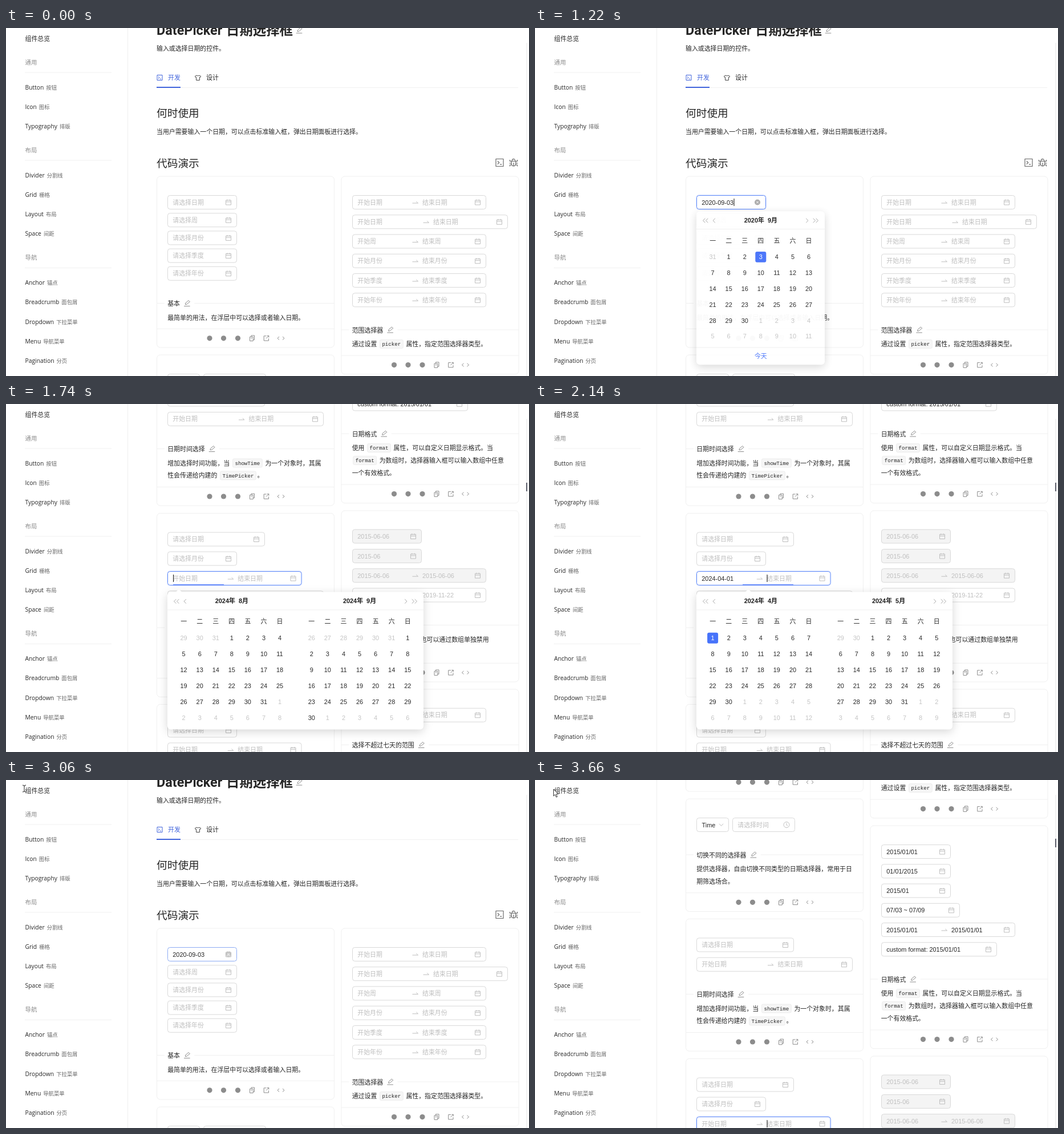
An HTML page for the animation above (4.26 s loop, 917 by 610 pixels).

```html
<!DOCTYPE html>
<html lang="zh-CN">
<head>
<meta charset="utf-8">
<title>日期选择框</title>
<style>
html, body { margin: 0; width: 100%; height: 100%; overflow: hidden; background: #fff; }
svg { display: block; width: 100vw; height: 100vh; }
text { font-family: "Liberation Sans", "Noto Sans CJK SC", "Noto Sans CJK", sans-serif; white-space: pre; }
.side { font-family: "Open Sans", "Noto Sans CJK SC", "Noto Sans CJK", sans-serif; }
.head { font-family: Roboto, "Noto Sans CJK SC", "Noto Sans CJK", sans-serif; }
.code { font-family: "Liberation Mono", monospace; }
.sheet { filter: drop-shadow(0 4px 8px rgba(0,0,0,.16)); }
</style>
</head>
<body>
<svg id="stage" viewBox="0 0 917 610" preserveAspectRatio="none">
  <g id="page"></g><g id="side"></g><g id="over"></g>
</svg>
<script>
const EM = 10.92, LOOP = 4260;
const INK = '#262626', HINT = '#bfbfbf', GREY = '#8c8c8c', RULE = '#f0f0f0', EDGE = '#d9d9d9';
const BLUE = '#4773fa', TAB = '#4164dc';
const el = id => document.getElementById(id);

// Text is placed by its visual centre line.
const text = (x, y, s, { size = EM, fill = INK, cls = '', mid = false, bold = false } = {}) =>
  `<text x="${x}" y="${y + size * .37}" font-size="${size}" fill="${fill}" class="${cls}"` +
  `${mid ? ' text-anchor="middle"' : ''}${bold ? ' font-weight="700"' : ''}>${s}</text>`;
const rect = (x, y, w, h, r, fill, stroke = 'none') =>
  `<rect x="${x}" y="${y}" width="${w}" height="${h}" rx="${r}" fill="${fill}" stroke="${stroke}"/>`;
const line = (x1, y1, x2, y2, c = RULE, w = 1) =>
  `<path d="M${x1} ${y1}L${x2} ${y2}" stroke="${c}" stroke-width="${w}"/>`;
const icon = (x, y, d, c = GREY, w = 1) =>
  `<path transform="translate(${x} ${y})" d="${d}" fill="none" stroke="${c}" stroke-width="${w}" stroke-linejoin="round"/>`;
const caret = (x, y) => line(x, y - 6.5, x, y + 6.5, '#111');

const CAL = 'M-4.5-3.5h9v8h-9zM-4.5-.7h9M-2.2-5v2.6M2.2-5v2.6';
const CLOCK = 'M5 0A5 5 0 1 1-5 0A5 5 0 1 1 5 0M0-3V.3L2.2 1.7';
const PENCIL = 'M-3 2.2L-2.5-.4L2.8-5L5-2.7L-.4 1.8ZM-5.3 5H5.3';
const ARROW = 'M-5 1.5H5L1.8-1.5';
const TERM = 'M-4.5-4.5h9v9h-9zM-2.5-2L-.5 0L-2.5 2M.5 2.2h2';
const SHIRT = 'M-2-4Q0-2 2-4L5-2.5L4-.3L2.9-.7V4.5H-2.9V-.7L-4-.3L-5-2.5Z';
const BUG = 'M-3.8-2.5H3.8V2A3.8 4 0 0 1-3.8 2ZM-2.8-2.5A2.8 3.8 0 0 1 2.8-2.5M0 0V6M-7.5 1H-3.8M3.8 1H7.5M-6.5-5V-2.5H-3.8M6.5-5V-2.5H3.8M-6.5 6.5V4H-3.5M6.5 6.5V4H3.5';
const COPY = 'M-4-2.5h5.8v7.3H-4zM-1.6-2.5V-4.8H4V2.6H1.8M-2.2 0H0';
const EXPORT = 'M0-4H-4.3V4.3H4V.5M1.3-4.3H4.3V-1.3M4.3-4.3L-.5.5';
const CODE = 'M-3-2.8L-6 0L-3 2.8M3-2.8L6 0L3 2.8';

const clear = (x, y, o = 1) => `<g opacity="${o}"><circle cx="${x}" cy="${y}" r="5" fill="#adadad"/>` +
  icon(x, y, 'M-1.8-1.8L1.8 1.8M1.8-1.8L-1.8 1.8', '#fff') + '</g>';

function box(x, y, w, o = {}) {
  const edge = o.edge || EDGE;
  return (o.glow ? rect(x - .5, y - 13.2, w + 1, 26.4, 5, 'none', '#e6edff') : '') +
    rect(x + .5, y - 12, w - 1, 24, 4, o.off ? '#f4f4f4' : '#fff', edge);
}
function field(x, y, w, s, o = {}) {
  const fill = o.dark ? INK : HINT;
  return box(x, y, w, o) + text(x + 9.3, y, s, { fill }) +
    (o.clear === 1 ? '' : icon(x + w - 15, y, o.icon || CAL, HINT)) +
    (o.clear ? clear(x + w - 15, y, o.clear) : '');
}
function range(x, y, w, a, b, o = {}) {
  return field(x, y, w, a, o) + icon(x + w / 2 - 7, y, ARROW, HINT) +
    text(x + w / 2 + 5.5, y, b, { fill: o.darkEnd ? INK : HINT });
}
// Backticks mark inline code.
function rich(x, y, s) {
  let out = '';
  s.split('`').forEach((part, i) => {
    if (i % 2) {
      const w = part.length * 5.5 + 9;
      out += rect(x + 2, y - 7.5, w - 1, 15, 2.5, '#f6f6f6', '#ededed') +
        text(x + 6, y, part, { size: 9.17, cls: 'code' });
      x += w + 3;
    } else if (part) {
      const lead = part.length - part.trimStart().length;
      out += text(x + lead * 3, y, part.trim());
      for (const c of part) x += c === ' ' ? 3 : EM;
    }
  });
  return out;
}
function card(x, top, bottom, title, ty, lines, body) {
  const end = x + 19.5 + title.length * EM;
  let out = rect(x + .5, top + .5, 311, bottom - top, 6, 'none', RULE) + body;
  if (!title) return out;
  out += line(x, ty - .5, x + 14, ty - .5) + line(end + 25, ty - .5, x + 312, ty - .5) +
    text(x + 19.2, ty, title) + icon(end + 12, ty - .5, PENCIL);
  lines.forEach((s, i) => out += rich(x + 19.2, ty + 24.5 + i * 21.9, s));
  if (!lines.length) return out;
  const fy = bottom - 15.7;
  out += line(x, fy - 16.5, x + 312, fy - 16.5);
  [93, 117.5, 142.5].forEach(dx => out += `<circle cx="${x + dx}" cy="${fy}" r="4.6" fill="${GREY}"/>`);
  return out + icon(x + 167.5, fy, COPY) + icon(x + 192.5, fy, EXPORT) + icon(x + 218, fy, CODE);
}

function intro() {
  return text(264, 3, 'DatePicker', { size: 23.4, cls: 'head', bold: true }) +
    text(386, 3, '日期选择框', { size: 23.4, cls: 'head', bold: true }) +
    icon(514, 4, PENCIL) + text(264, 36, '输入或选择日期的控件。') +
    icon(269.5, 87, TERM, TAB) + text(284, 87, '开发', { fill: TAB }) +
    icon(336.5, 87, SHIRT, '#444') + text(351, 87, '设计') +
    line(264, 104.5, 898, 104.5) + line(264, 104, 306, 104, TAB, 2) +
    text(264, 149.5, '何时使用', { size: 18.72 }) +
    text(264, 182, '当用户需要输入一个日期，可以点击标准输入框，弹出日期面板进行选择。') +
    text(264, 237, '代码演示', { size: 18.72 }) +
    `<g transform="translate(865.5 236) scale(1.45)">${icon(0, 0, TERM, '#666', .8)}</g>` + icon(890, 236, BUG, '#666', 1.2);
}
function pageArt(s) {
  const L = 283, R = 607, S = '开始日期', E = '结束日期', D = '2015-06-06';
  const off = { off: true }, dark = { dark: true };
  let basic = field(L, 305.5, 122, s.date || '请选择日期',
    { dark: s.date, edge: s.edge, glow: s.glow, clear: s.wipe });
  ['周', '月份', '季度', '年份'].forEach((n, i) => basic += field(L, 336.7 + i * 31.2, 122, '请选择' + n));

  let spans = '';
  ['日期', '日期', '周', '月份', '季度', '年份'].forEach((n, i) =>
    spans += range(R, 305.5 + i * 34.25, i === 1 ? 273 : 235, '开始' + n, '结束' + n));

  const kinds = box(L, 618.5, 57) + text(292.5, 618.5, 'Time') +
    icon(326.5, 618.5, 'M-3.5-1.8L0 2L3.5-1.8', HINT) + field(346, 618.5, 110, '请选择时间', { icon: CLOCK });

  const formats = ['2015/01/01', '01/01/2015', '2015/01'].map((v, i) =>
      field(R, 665.6 + i * 34.25, 122, v, dark)).join('') +
    field(R, 768.3, 138, '07/03 ~ 07/09', dark) +
    range(R, 802.5, 235, '2015/01/01', '2015/01/01', { dark: true, darkEnd: true }) +
    field(R, 836.8, 203, 'custom format: 2015/01/01', dark);

  const limits = field(L, 1074, 171, '请选择日期') + field(L, 1108, 122, '请选择月份') +
    range(L, 1142.5, 235.5, s.from || S, s.to || E,
      { dark: s.from, darkEnd: s.to, edge: s.redge, glow: s.redge, clear: s.rwipe }) +
    (s.bar ? line(s.bar, 1154, s.bar + 89, 1154, BLUE, 1.6) : '') +
    range(L, 1176.7, 274, S, E);

  const locked = field(R, 1069, 122, D, off) + field(R, 1103.5, 122, '2015-06', off) +
    range(R, 1137.7, 235, D, D, off) + range(R, 1172, 235, '2019-09-03', '2019-11-22', dark);

  return intro() +
    card(264, 259.5, 559.5, '基本', 483, ['最简单的用法，在浮层中可以选择或者输入日期。'], basic) +
    card(264, 572.5, 770, '切换不同的选择器', 671.5,
      ['提供选择器，自由切换不同类型的日期选择器，常用于日', '期筛选场合。'], kinds) +
    card(264, 783, 1014.7, '日期时间选择', 916,
      ['增加选择时间功能，当 `showTime` 为一个对象时，其属', '性会传递给内建的 `TimePicker`。'],
      field(L, 829, 171, '请选择日期') + range(L, 863.3, 274, S, E)) +
    card(264, 1028, 1350, '不可选择日期和时间', 1229.5,
      ['可用 `disabledDate` 和 `disabledTime` 分别禁止选择',
       '部分日期和时间，其中 `disabledTime` 需要和', '`showTime` 一起使用。'], limits) +
    card(264, 1363, 1600, '', 0, [], field(L, 1409, 122, '请选择日期') + range(L, 1443, 235.5, S, E)) +
    card(587.5, 259.5, 606.3, '范围选择器', 529.5, ['通过设置 `picker` 属性，指定范围选择器类型。'], spans) +
    card(587.5, 619.5, 1010.3, '日期格式', 889.5,
      ['使用 `format` 属性，可以自定义日期显示格式。当',
       '`format` 为数组时，选择器输入框可以输入数组中任意', '一个有效格式。'], formats) +
    card(587.5, 1023.5, 1323.5, '禁用', 1225,
      ['选择框的不可用状态。你也可以通过数组单独禁用', 'RangePicker 的其中一项。'], locked) +
    card(587.5, 1336.5, 1600, '选择不超过七天的范围', 1435, [], range(R, 1382.3, 235, S, E));
}

function sideArt() {
  let out = text(33.5, 18.5, '组件总览') + line(213.5, 0, 213.5, 610) + line(913, 26, 913, 610, '#e4e4e4');
  const groups = [
    [60, '通用', 'Button 按钮,Icon 图标,Typography 排版'],
    [214, '布局', 'Divider 分割线,Grid 栅格,Layout 布局,Space 间距'],
    [402.5, '导航', 'Anchor 锚点,Breadcrumb 面包屑,Dropdown 下拉菜单,Menu 导航菜单,Pagination 分页'],
  ];
  for (const [y, name, items] of groups) {
    out += text(33.5, y, name, { size: 10.4, fill: GREY }) + line(33, y + 18, 185, y + 18);
    items.split(',').forEach((item, i) => {
      const [en, zh] = item.split(' ');
      out += text(33.5, y + 43.7 + i * 34.25,
        `${en}<tspan dx="4" font-size="9.36" fill="#666">${zh}</tspan>`, { size: 10.3, cls: 'side' });
    });
  }
  return out;
}

function month(x, top, year, mon, pick) {
  const lead = (new Date(year, mon - 1, 1).getDay() + 6) % 7;
  let out = text(x + 84.2, top + 16, `${year}年&#160; ${mon}月`.replace('&#160; ', '&#160;&#160;'), { mid: true, bold: true, fill: '#1f1f1f' });
  [...'一二三四五六日'].forEach((c, i) => out += text(x + i * 28.07, top + 51.9, c, { mid: true }));
  for (let i = 0; i < 42; i++) {
    const day = new Date(year, mon - 1, 1 - lead + i), own = day.getMonth() === mon - 1;
    const cx = x + i % 7 * 28.07, cy = top + 80.8 + Math.floor(i / 7) * 28;
    const on = own && day.getDate() === pick;
    if (on) out += rect(cx - 9.5, cy - 9.5, 19, 19, 3, BLUE);
    out += text(cx, cy, day.getDate(), { mid: true, fill: on ? '#fff' : own ? INK : '#c4c4c4' });
  }
  return out;
}
function panel(s) {
  const { k, year, mon, pick, two } = s;
  const top = two ? 329.4 : 321.2, w = two ? 449 : 225, h = two ? 241 : 271, right = 283 + w;
  const zero = top - 8, sy = .8 + .2 * k, chev = 'M1.8-3.8L-2 0L1.8 3.8', back = 'M-1.8-3.8L2 0L-1.8 3.8';
  let out = `<g class="sheet">${rect(283, top, w, h, 6, '#fff')}` +
    (two ? `<path d="M${s.tip - 6} ${top + .5}l6-5l6 5z" fill="#fff"/>` : '') + '</g>' +
    line(283, top + 31.5, right, top + 31.5);
  [[296.5, chev], [301.5, chev], [314, chev], [right - 31, back], [right - 18.5, back], [right - 13.5, back]]
    .forEach(([x, d]) => out += icon(x, top + 16.5, d, '#aaa'));
  out += month(311.6, top, year, mon, pick);
  if (two) out += month(535.8, top, year, mon + 1);
  else out += line(283, top + 240.5, right, top + 240.5) + text(395.8, top + 255.7, '今天', { mid: true, fill: BLUE });
  return `<g opacity="${k}" transform="translate(0 ${zero * (1 - sy)}) scale(1 ${sy})">${out}</g>`;
}

const BEAM = icon(32, 15, 'M-3-6Q0-6 0-4Q0-6 3-6M0-4V4M-3 6Q0 6 0 4Q0 6 3 6', '#222');
const POINTER = '<path d="M32.5 16v12l2.7-2.5l2 4.6l1.9-.8l-2-4.5h3.8z" fill="#fff" stroke="#222" stroke-width=".9"/>';

const FOCUS = '#5b86f8', DEEP = 837, thumbY = y => 39.2 + y * .118;
const open1 = { edge: FOCUS, glow: true, year: 2024, mon: 9, k: 1, caret: [293, 305.5] };
const done1 = { ...open1, date: '2020-09-03', caret: [349, 305.5], wipe: 1 };
const open2 = { scroll: DEEP, thumb: 1, redge: FOCUS, two: true, year: 2024, mon: 9, k: 1, bar: 293, tip: 303, caret: [293.5, 305.5] };
const half2 = { ...open2, from: '2024-04-01', bar: 406, tip: 417, caret: [407, 305.5] };
const done2 = { ...half2, to: '2024-09-01', caret: [463, 305.5], rwipe: 1 };
const tail = { redge: FOCUS, mouse: POINTER };

const steps = [
  [0, {}],
  [620, { ...open1, k: .4 }],
  [720, open1],
  [820, { ...open1, year: 2023 }],
  [920, { ...open1, year: 2022 }],
  [1020, { ...open1, year: 2021 }],
  [1120, { ...open1, year: 2020 }],
  [1220, { ...done1, year: 2020, pick: 3, k: .965 }],
  [1320, { ...done1, k: 0 }],
  [1420, { scroll: DEEP, thumb: 1 }],
  [1520, { ...open2, k: .36, bar: 360 }],
  [1640, open2],
  [1740, { ...open2, mon: 8 }],
  [1840, { ...open2, mon: 7 }],
  [1940, { ...open2, mon: 6 }],
  [2040, { ...open2, mon: 4 }],
  [2140, { ...half2, mon: 4, pick: 1, bar: 364, tip: 374 }],
  [2240, { ...half2, mon: 5 }],
  [2340, { ...half2, mon: 6 }],
  [2440, { ...half2, mon: 7 }],
  [2540, { ...half2, mon: 8 }],
  [2640, half2],
  [2740, { ...done2, pick: 1, k: .965 }],
  [2840, { ...done2, k: 0 }],
  [2940, { ...done2, k: 0, bar: 0, caret: null, rwipe: 0, redge: '', mouse: BEAM }],
  [3060, { date: '2020-09-03', edge: '#8cabf3', wipe: .55, mouse: BEAM }],
  [3160, { mouse: BEAM }],
  [3260, { mouse: POINTER }],
  [3360, { ...tail, scroll: 180 }],
  [3460, { ...tail, scroll: 360 }],
  [3560, { ...tail, scroll: 540 }],
  [3660, { ...tail, scroll: 540, thumb: 1, caret: [407, 602.5] }],
];

let shown = -1;
function draw(ms) {
  let i = steps.length - 1;
  while (steps[i][0] > ms) i--;
  if (i === shown) return;
  shown = i;
  const s = steps[i][1], scroll = s.scroll || 0;
  el('page').setAttribute('transform', `translate(0 ${-scroll})`);
  el('page').innerHTML = pageArt(s);
  el('over').innerHTML = (s.thumb ? rect(912, thumbY(scroll), 2, 15, 0, '#5c5f6b') : '') +
    (s.caret ? caret(...s.caret) : '') + (s.k ? panel(s) : '') + (s.mouse || '');
}

el('side').innerHTML = sideArt();
const start = performance.now();
function tick() {
  draw((performance.now() - start) % LOOP);
  requestAnimationFrame(tick);
}
tick();
</script>
</body>
</html>
```
